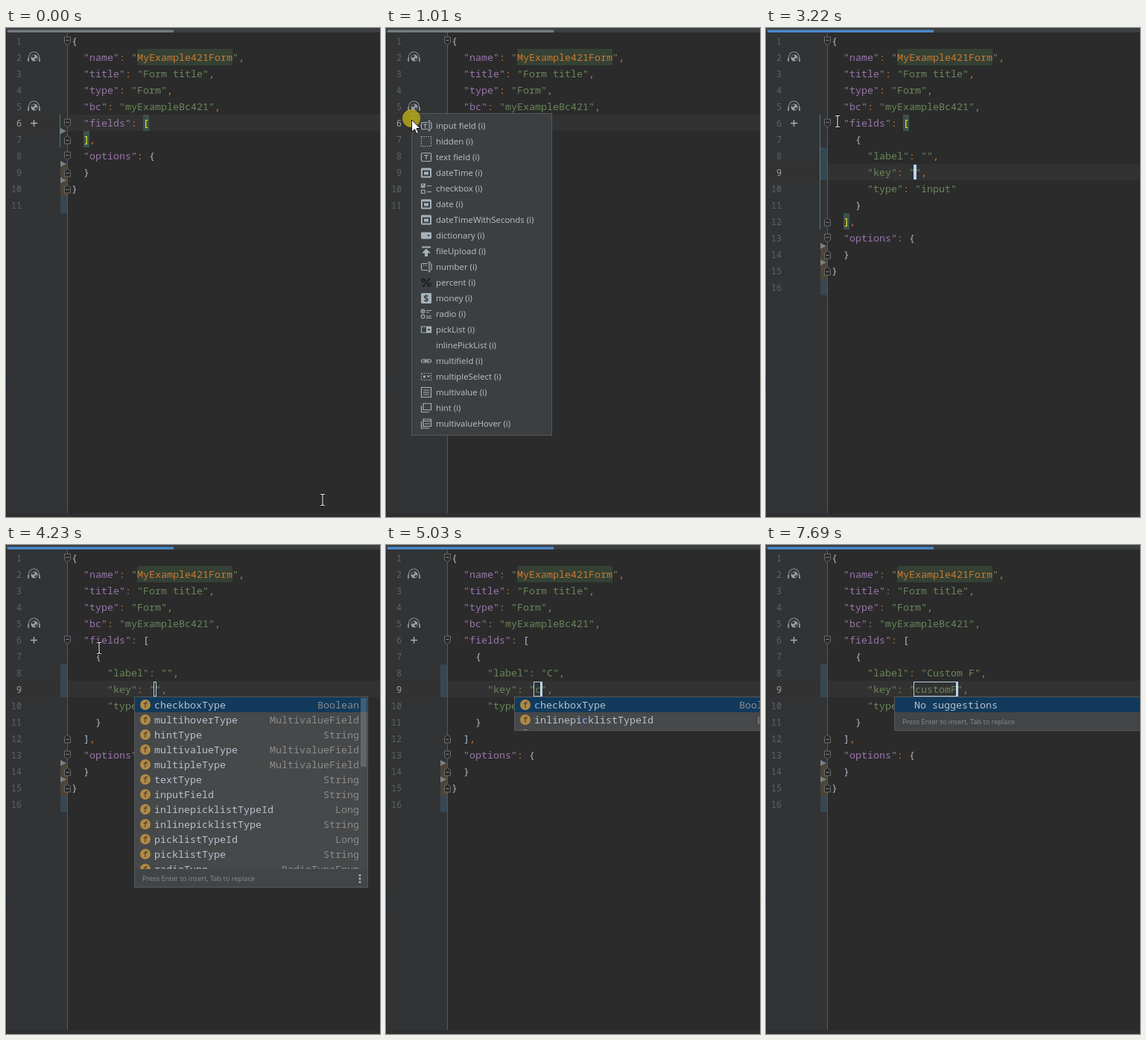
Animation of 502 by 655 pixels, one loop 8000 ms. Source, as an HTML page with a canvas:

```html
<!DOCTYPE html>
<html lang="en">
<head>
<meta charset="utf-8">
<title>Form editor</title>
<style>
html, body { margin: 0; height: 100%; overflow: hidden; background: #2b2b2b; }
canvas { display: block; }
</style>
</head>
<body>
<canvas id="stage" width="502" height="655"></canvas>
<script>
const ctx = document.getElementById('stage').getContext('2d');
const LOOP = 8000, CHAR = 8, ROW = 22, CODE_X = 88;
const MONO = '"Noto Sans Mono", monospace', SANS = '"Open Sans", sans-serif';
const CODE_FONT = `13.333px ${MONO}`;
const GREY = '#a6b1b9', GREEN = '#6a8759', ORANGE = '#cc7832', PLAIN = '#a9b7c6';

const KEY_TIMES = [4630, 5100, 5430, 5630, 6760, 7220, 7690];

// Menu entries: label, stroked icon path, filled icon path
const T = 'M-4-2H1M-1.5-2V3';
const FIELD = 'M2-4.5H-5Q-6.5-4.5-6.5-3V3Q-6.5 4.5-5 4.5H2M4-6V6M2.5-6.5H5.5M2.5 6.5H5.5M5.5-4.5Q7-4.5 7-3V3Q7 4.5 5.5 4.5';
const CALENDAR = 'M-6-6.5H6L7-5.5V5.5L6 6.5H-6L-7 5.5V-5.5ZM-5-3.5H5V4.5H-5ZM-3-1.5H3V2.5H-3Z';
const MENU = [
  ['input field', FIELD + T],
  ['hidden', 'M-6.5-6.5H6.5V6.5H-6.5Z'],
  ['text field', 'M-5-5.5H5Q6.5-5.5 6.5-4V4Q6.5 5.5 5 5.5H-5Q-6.5 5.5-6.5 4V-4Q-6.5-5.5-5-5.5ZM-3-2.5H3M0-2.5V3'],
  ['dateTime', '', CALENDAR],
  ['checkbox', 'M-6.5-6H-2V-1.5H-6.5ZM-6.5 2H-2V6.5H-6.5ZM1-3.5H7M1 4.5H7M-6-4L-4.5-2.5-1-6.5'],
  ['date', '', CALENDAR],
  ['dateTimeWithSeconds', '', CALENDAR],
  ['dictionary', '', 'M-6-4.5H6L7-3.5V3.5L6 4.5H-6L-7 3.5V-3.5ZM1-1H5L3 1.5Z'],
  ['fileUpload', '', 'M-6-6.5H6V-4.5H-6ZM0-3.5L6 2.5H2V7H-2V2.5H-6Z'],
  ['number', FIELD + 'M-4-2H-2.5M-1-2H.5'],
  ['percent', 'M5-6L-5 6M-2-3A2 2 0 1 1-2-3.1M6 3A2 2 0 1 1 6 2.9'],
  ['money', '', 'M-6-7H6L7-6V6L6 7H-6L-7 6V-6Z'],
  ['radio', 'M-2-3.5A2.4 2.4 0 1 1-2-3.6M-2 3.5A2.4 2.4 0 1 1-2 3.4M0-4.5H7M0-2H4M0 3H7M0 5.5H7', 'M-5.5-4.5H-3.5V-2.5H-5.5Z'],
  ['pickList', 'M-6.5-4H6.5V4H-6.5Z', 'M0-4H6.5V4H0ZM2-1H5V1H2Z'],
  ['inlinePickList'],
  ['multifield', 'M-1-2H-5Q-6.5-2-6.5 0T-5 2H-1ZM1-2H5Q6.5-2 6.5 0T5 2H1ZM-4 0H4'],
  ['multipleSelect', 'M-6.5-4.5H6.5V4.5H-6.5Z', 'M-4-1.5H-1V1.5H-4ZM1-1.5H5L3 1.5Z'],
  ['multivalue', 'M-6.5-6.5H6.5V6.5H-6.5ZM-4-3H4M-4 0H4M-4 3H4'],
  ['hint', 'M-4-6H6.5V2.5H-4ZM-6.5-3V5.5H4'],
  ['multivalueHover', 'M-4-6H6.5V3.5H-4ZM-6.5-3V6H4M-4-3.5H6.5M-2 0H5'],
];

const ALL_FIELDS = [
  ['checkboxType', 'Boolean'], ['multihoverType', 'MultivalueField'], ['hintType', 'String'],
  ['multivalueType', 'MultivalueField'], ['multipleType', 'MultivalueField'], ['textType', 'String'],
  ['inputField', 'String'], ['inlinepicklistTypeId', 'Long'], ['inlinepicklistType', 'String'],
  ['picklistTypeId', 'Long'], ['picklistType', 'String'], ['radioType', 'RadioTypeEnum'],
];
const C_FIELDS = [
  ...ALL_FIELDS.filter(([name]) => name.includes('c')),
  ['dictionaryType', 'DictionaryEnum'], ['dateTimeWithSecondsType', 'LocalDateTime'],
  ['secondsType', 'String'], ['childCount', 'Long'],
];

function rect(x, y, w, h, color) {
  ctx.fillStyle = color;
  ctx.fillRect(x, y, w, h);
}

function text(str, x, y, color, font = CODE_FONT, align = 'left') {
  ctx.font = font;
  ctx.textAlign = align;
  ctx.fillStyle = color;
  ctx.fillText(str, x, y);
}

function path(d, x, y, { fill, stroke, width = 1, dash = [] }) {
  const shape = new Path2D(d);
  ctx.save();
  ctx.translate(x, y);
  ctx.setLineDash(dash);
  ctx.lineWidth = width;
  if (fill) { ctx.fillStyle = fill; ctx.fill(shape, 'evenodd'); }
  if (stroke) { ctx.strokeStyle = stroke; ctx.stroke(shape); }
  ctx.restore();
}

function disc(x, y, r, color) {
  ctx.fillStyle = color;
  ctx.beginPath();
  ctx.arc(x, y, r, 0, 7);
  ctx.fill();
}

const rowY = line => 17 + ROW * (line - 1);

function codeLines(edited, label, key) {
  const inner = edited
    ? ['    {', `      "label": "${label}",`, `      "key": "${key}",`, '      "type": "input"', '    }']
    : [];
  return ['{', '  "name": "MyExample421Form",', '  "title": "Form title",', '  "type": "Form",',
    '  "bc": "myExampleBc421",', '  "fields": [', ...inner, '  ],', '  "options": {', '  }', '}', ''];
}

function drawCode(line, y, matchBrackets) {
  for (const { 0: token, index } of line.matchAll(/"[^"]*"|[^\s"]/g)) {
    const x = CODE_X + CHAR * index, outer = index < 4;
    let color = PLAIN;
    if (token[0] === '"') color = outer && line[index + token.length] === ':' ? '#9876aa' : GREEN;
    else if (/[:,]/.test(token)) color = ORANGE;
    else if (matchBrackets && /[[\]]/.test(token)) {
      rect(x, y - 11, CHAR, ROW, '#3b514d');
      color = '#ffef28';
    }
    text(token, x, y + 5, color);
    if (token.includes('421Form')) {
      const width = CHAR * (token.length - 2);
      rect(x + CHAR, y - 11, width, ROW, '#344134');
      text(token.slice(1, -1), x + CHAR, y + 5, ORANGE);
    }
  }
}

function foldMark(y, direction) {
  ctx.save();
  ctx.translate(82.5, y + .5);
  ctx.scale(1, direction);
  path('M-4-5.5H4V2L0 5.5-4 2Z', 0, 0, { fill: '#2b2b2b', stroke: '#6a6c6e' });
  path('M-2-1H2', 0, 0, { stroke: '#8a8c8e' });
  ctx.restore();
}

function globe(y) {
  path('M-7 3V0A7 7 0 0 1 7 0V3', 37.5, y, { stroke: '#858c91', width: 1.2 });
  disc(38, y + 1, 4.5, '#9aa1a6');
  path('M-4-1L-2-4 1-3 0-1-2 0ZM0 2L2 0 4 1 2 4Z', 38, y + 1, { fill: '#35393c' });
  rect(29, y + 1, 2, 5, '#858c91');
  rect(44, y + 1, 2, 5, '#858c91');
}

function drawEditor(t, edited, label, key) {
  const lines = codeLines(edited, label, key);
  const current = edited ? 9 : 6, matching = t < 3350;
  const shift = edited ? 110 : 0;

  rect(0, 0, 502, 655, '#2b2b2b');
  rect(0, 0, 82, 655, '#313335');
  rect(0, rowY(current) - 11, 502, ROW, '#323232');
  rect(0, 0, 502, 6, '#3c3f41');
  rect(2, 2.5, 223, 3.5, edited ? '#4a88c7' : '#747a80');
  rect(0, 6, 1, 649, '#2b2b2b');
  rect(0, 467, 1, 19, '#1a2233');
  rect(0, 650, 502, 5, '#2d2f30');

  if (edited) rect(73, 160, 9, 44, '#374752');
  rect(73, 182 + shift, 9, 44, '#4d4538');
  rect(73, 226 + shift, 9, 22, '#374752');
  if (matching) rect(72, 116, 1, edited ? 154 : 44, '#51827b');
  rect(82, 6, 1, 644, '#555759');
  for (const y of edited ? [292, 314] : [138, 182, 204])
    path('M0-4L8 0 0 4Z', 73, y, { fill: '#7b8084' });

  lines.forEach((line, i) => {
    const y = rowY(i + 1);
    text(i + 1, 21, y + 5, i + 1 === current ? '#a4a3a3' : '#606366', `11.7px ${MONO}`, 'right');
    drawCode(line, y, matching);
    if (/^( {2})?\S.*[{[]$|^{$/.test(line)) foldMark(y, 1);
    if (/^( {2})?[}\]]/.test(line)) foldMark(y, -1);
  });
  globe(rowY(2));
  globe(rowY(5));
  path('M-4.5 0H4.5M0-4.5V4.5', 37.5, 127.5, { stroke: GREY, width: 1.4 });
}

function drawKeyBox(t, length) {
  const right = 200 + CHAR * length;
  ctx.strokeStyle = '#b4cce4';
  ctx.lineWidth = 1;
  ctx.strokeRect(199 - .5, 183.5, right - 199 + 2, 19);
  const blinkedOff = (t >= 4230 && t < 4630) || (t >= 6230 && t < 6760);
  if (!blinkedOff) rect(right - 1, 184, 2, 18, '#bcd8f4');
}

function drawMenu(hover) {
  rect(34, 114, 189, 432, '#555759');
  rect(35, 115, 187, 430, '#3c3f41');
  if (hover) rect(35, 120, 187, 21, '#4b6eaf');
  MENU.forEach(([label, stroke, fill], i) => {
    const y = 131 + 21 * i;
    const percent = label === 'percent', color = percent ? '#1e2022' : GREY;
    const dash = /hidden|Select/.test(label) ? [1.5, 1.5] : [];
    if (stroke) path(stroke, 54, y, { stroke: color, width: percent ? 2 : 1.2, dash });
    if (fill) path(fill, 54, y, { fill: color });
    if (label === 'money') text('$', 54, y + 4.5, '#3c3f41', `bold 12px ${SANS}`, 'center');
    text(label + ' (i)', 67, y + 4, '#bfc1c2', `11.4px ${SANS}`);
  });
}

function drawPopup({ right, bottom, items, typeX, footer = 25, match, scroll }) {
  const listEnd = bottom - footer;
  rect(172, 203, right - 172, bottom - 203, '#55585a');
  rect(173, 204, right - 174, bottom - 205, '#46484a');
  rect(173, 204, right - 174, 20, '#113a5c');
  ctx.save();
  ctx.beginPath();
  ctx.rect(173, 204, right - 174, listEnd - 204);
  ctx.clip();
  items.forEach(([name, type], i) => {
    const y = 214 + 20 * i;
    text(name, 199, y + 5, '#b7c2cd');
    if (!type) return;
    disc(187, y, 7, '#b08a45');
    text('f', 187, y + 4, '#3b3224', `11px ${MONO}`, 'center');
    text(type, typeX, y + 5, '#8c8c8c', CODE_FONT, 'right');
    if (match) text(match, 199 + CHAR * name.indexOf(match), y + 5, '#589df6');
  });
  if (scroll) rect(476, 205, 8, 92, 'rgba(140,145,150,.4)');
  ctx.restore();
  if (footer > 1) {
    rect(173, listEnd, right - 174, footer - 1, '#424547');
    text('Press Enter to insert, Tab to replace', 183, listEnd + 16, '#8a8c8e', `9.2px ${SANS}`);
    for (const dy of [-4.5, 0, 4.5]) disc(475 + right - 486, listEnd + 13 + dy, 1.5, GREY);
  }
}

function drawSuggestions(t) {
  if (t < 3570) return;
  if (t < 4700) drawPopup({ right: 486, bottom: 459, items: ALL_FIELDS, typeX: 474, scroll: true });
  else if (t < 5100) {
    const shrunk = t >= 5030;
    drawPopup({ right: 542, bottom: shrunk ? 249 : 409, items: C_FIELDS, typeX: 530,
      footer: shrunk ? 1 : 25, match: 'c' });
  } else drawPopup({ right: 542, bottom: 249, items: [['No suggestions']] });
}

const CURSORS = {
  beam: (x, y) => {
    const d = 'M-3-7.5H-1L0-6.5 1-7.5H3M0-6.5V6.5M-3 7.5H-1L0 6.5 1 7.5H3';
    path(d, x, y, { stroke: '#111', width: 3 });
    path(d, x, y, { stroke: '#e4e4e4', width: 1.2 });
  },
  arrow: (x, y) => path('M0 0V16L4 12.5 6.5 18.5 9 17.5 6.5 11.5H11.5Z', x, y + 1, { fill: '#fff', stroke: '#111' }),
  hand: (x, y) => path('M-1.5 1Q0-1 1.5 1V7L10 9Q11 10 11 15L9 21H0L-6 13Q-6 10-3 12L-1.5 13Z', x, y,
    { fill: '#fff', stroke: '#111' }),
};

// Pointer legs: start, end, from, to, power of the ease (0 = smoothstep)
const LEGS = [
  [70, 670, [425, 632], [34, 101], 0],
  [940, 941, [34, 101], [34.5, 122], 1],
  [1810, 1880, [34.5, 122], [36, 122], 1],
  [2150, 2820, [36, 122], [94, 135], 1.5],
  [3020, 3220, [94, 135], [96, 125], 1],
  [3350, 3640, [96, 125], [125, 138], 0],
];

function pointerAt(t) {
  const [start, end, from, to, power] = LEGS.findLast(leg => t >= leg[0]) || LEGS[0];
  const p = Math.min(1, Math.max(0, (t - start) / (end - start)));
  const eased = power ? p ** power : p * p * (3 - 2 * p);
  return from.map((v, i) => v + (to[i] - v) * eased);
}

function drawPointer(t) {
  if (t >= 4630) return;
  const [x, y] = pointerAt(t);
  if (t >= 940 && t < 1210) disc(34, 121, 12, 'rgba(203,187,20,.73)');
  const kind = t >= 940 && t < 3090 ? 'arrow' : x > 82 ? 'beam' : x > 46 ? 'arrow' : 'hand';
  CURSORS[kind](x, y);
}

function frame(now) {
  const t = now % LOOP;
  const edited = t >= 3090;
  const count = KEY_TIMES.filter(time => t >= time).length;
  const key = 'customF'.slice(0, count);
  const label = 'Custom F'.slice(0, count === 7 ? 8 : count);

  drawEditor(t, edited, label, key);
  if (t >= 3350) path('M-3-7H3M0-7V7M-3 7H3', 96, 125, { stroke: '#26324a', width: 1.2 });
  if (edited) drawKeyBox(t, count);
  if (t >= 1010 && t < 3020) drawMenu(t >= 1810);
  drawSuggestions(t);
  drawPointer(t);
  requestAnimationFrame(frame);
}
requestAnimationFrame(frame);
</script>
</body>
</html>
```
